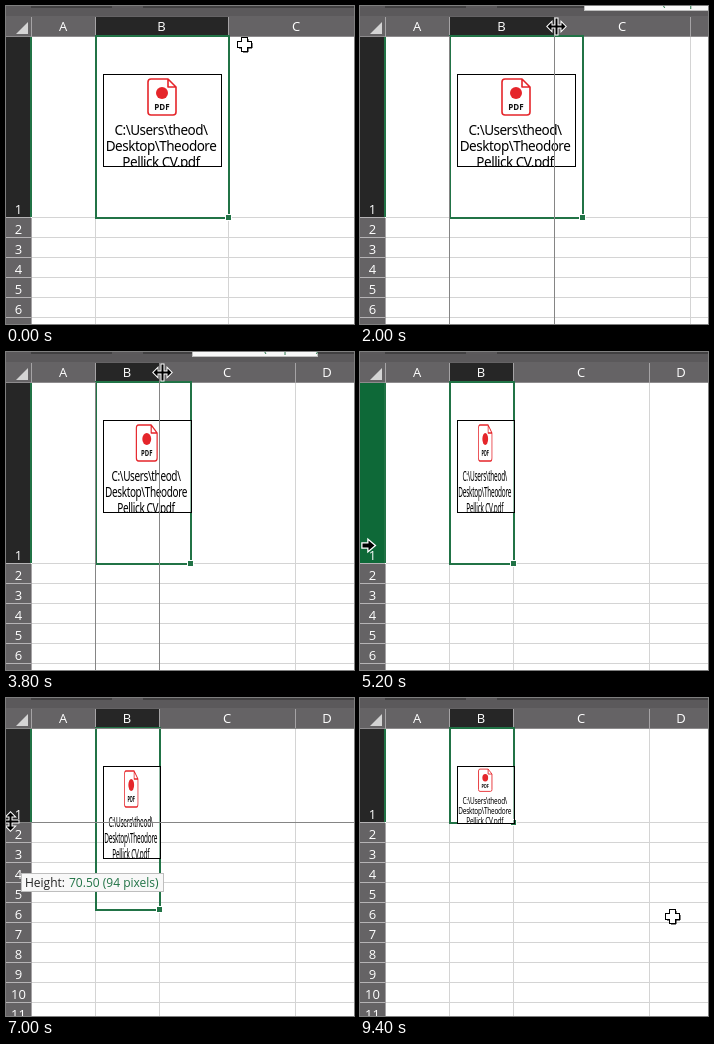
An HTML page with a canvas that plays this animation: 348x318 px, repeating every 9.6 s.

```html
<!DOCTYPE html>
<html lang="en">
<head>
<meta charset="utf-8">
<title>Resizing cells around an embedded file</title>
<style>
  html, body { margin: 0; width: 100%; height: 100%; overflow: hidden; background: #fff; }
  canvas { display: block; }
</style>
</head>
<body>
<canvas id="stage" width="348" height="318"></canvas>
<script>
const W = 348, H = 318, LOOP = 9600, STEP = 200;
const HEAD_X = 25, HEAD_Y = 30, COL_A = 89, COL_C_WIDTH = 136, ROW_HEIGHT = 20;
const GREEN = '#217346', HEADER = '#656365', SELECTED = '#262626', GRID = '#d4d4d4';
const UI_FONT = '13px "Open Sans", "Noto Sans", sans-serif';
const ctx = document.getElementById('stage').getContext('2d');

// Keyframes: [time, value...]
const COLUMN_EDGE = [[1400, 222], [2200, 184], [3200, 184], [3800, 153]];
const ROW_EDGE = [[5800, 211], [7000, 124]];
const POINTER = [
  [0, 238, 38], [200, 120, 160], [400, 9, 281], [600, 70, 170], [800, 180, 60], [1000, 225, 20],
  [1400, 225, 20], [2200, 186, 20], [3200, 186, 20], [3800, 156, 20], [4400, 156, 20],
  [4600, 146, 44], [4800, 108, 96], [5000, 48, 160], [5200, 8, 193], [5600, 4, 211],
  [5800, 4, 211], [7000, 4, 123], [8400, 4, 123],
  [8600, 60, 200], [8800, 150, 285], [9000, 240, 304], [9200, 294, 262], [9400, 312, 218]
];
const DRAGS = [
  { from: 1400, to: 2600, axis: 'x', start: 222 },
  { from: 2800, to: 4200, axis: 'x', start: 184 },
  { from: 5800, to: 7400, axis: 'y', start: 211 }
];

function sample(keys, t) {
  if (t <= keys[0][0]) return keys[0].slice(1);
  for (let i = 1; i < keys.length; i++) {
    const a = keys[i - 1], b = keys[i];
    if (t <= b[0]) {
      const k = (t - a[0]) / (b[0] - a[0]);
      return a.slice(1).map((v, n) => Math.round(v + (b[n + 1] - v) * k));
    }
  }
  return keys[keys.length - 1].slice(1);
}

function box(x, y, w, h, color) {
  ctx.fillStyle = color;
  ctx.fillRect(x, y, w, h);
}

function label(text, x, y, color = '#fff', align = 'center', font = UI_FONT) {
  ctx.font = font;
  ctx.fillStyle = color;
  ctx.textAlign = align;
  ctx.fillText(text, x, y);
}

function polygon(points, fill, stroke, width) {
  ctx.beginPath();
  points.forEach(([x, y]) => ctx.lineTo(x, y));
  ctx.closePath();
  if (stroke) {
    ctx.strokeStyle = stroke;
    ctx.lineWidth = width;
    ctx.stroke();
  }
  ctx.fillStyle = fill;
  ctx.fill();
}

function drawSheet(colEdge, rowEdge, hoverY) {
  box(0, 0, W, H, '#fff');
  box(0, 0, W, HEAD_Y + 1, HEADER);
  box(0, 0, W, 10, '#5b595b');
  box(5, 0, 101, 2, '#414041');
  box(137, 0, W, 2, '#414041');
  box(0, 0, HEAD_X, H, HEADER);
  box(0, 0, HEAD_X, 10, '#5b595b');
  box(0, HEAD_Y, W, 1, '#8d8b8d');
  polygon([[10, 28], [22, 28], [22, 16]], '#d4d4d4');

  const edges = [HEAD_X, COL_A, colEdge, colEdge + COL_C_WIDTH, colEdge + COL_C_WIDTH + 64];
  box(COL_A + 1, 11, colEdge - COL_A - 1, 18, SELECTED);
  box(COL_A + 1, 29, colEdge - COL_A - 1, 2, GREEN);
  edges.forEach((x, i) => {
    box(x, 11, 1, 20, '#a5a3a5');
    if (i) box(x, HEAD_Y + 1, 1, H, GRID);
    if (i < 4) label('ABCD'[i], (x + edges[i + 1]) / 2, 25);
  });

  const hovered = y0 => hoverY !== null && hoverY > y0;
  for (let row = 1, top = HEAD_Y; top < H; row++) {
    const bottom = row === 1 ? rowEdge : top + ROW_HEIGHT;
    const isHover = hovered(top) && hoverY < bottom;
    if (row === 1 || isHover) {
      box(0, top + 1, HEAD_X, bottom - top - 1, isHover ? '#0e6938' : SELECTED);
    }
    if (row === 1) box(HEAD_X - 1, top + 1, 2, bottom - top - 1, GREEN);
    box(0, bottom, HEAD_X, 1, '#b5b3b5');
    box(HEAD_X + 1, bottom, W, 1, GRID);
    label(row, 12.5, bottom - 3);
    top = bottom;
  }
  box(HEAD_X, rowEdge + 1, 1, H, '#a5a3a5');
}

function drawSelection(right, bottom) {
  ctx.strokeStyle = GREEN;
  ctx.lineWidth = 2;
  ctx.strokeRect(COL_A + 1, HEAD_Y, right - COL_A, bottom - HEAD_Y + 1);
  box(right - 3, bottom - 3, 7, 7, '#fff');
  box(right - 2, bottom - 2, 5, 5, GREEN);
}

// The embedded file shrinks together with its cell.
function drawFile(right, bottom) {
  const x = 97, y = 68;
  const w = Math.min(118, right + 0.5 - x), h = Math.min(92, bottom + 1 - y);
  ctx.save();
  ctx.beginPath();
  ctx.rect(x, y, w + 1, h + 1);
  ctx.clip();
  box(x, y, w, h, '#fff');
  ctx.translate(x, y);
  ctx.scale(w / 118, h / 92);

  ctx.strokeStyle = '#e5252a';
  ctx.lineWidth = 1.6;
  ctx.lineJoin = 'round';
  ctx.stroke(new Path2D('M48 5H65L73 13V38Q73 41 70 41H48Q45 41 45 38V8Q45 5 48 5ZM65 5V13H73'));
  ctx.fillStyle = '#e5252a';
  ctx.beginPath();
  ctx.arc(59, 19, 6, 0, 7);
  ctx.fill();
  label('PDF', 59, 36, '#111', 'center', 'bold 8px "Open Sans", sans-serif');

  ctx.letterSpacing = '-0.5px';
  ['C:\\Users\\theod\\', 'Desktop\\Theodore', 'Pellick CV.pdf'].forEach((line, i) =>
    label(line, 58, 61 + 16 * i, '#000', 'center', '13.5px "Noto Sans", "Open Sans", sans-serif'));
  ctx.letterSpacing = '0px';
  ctx.restore();
  ctx.strokeStyle = '#000';
  ctx.lineWidth = 1;
  ctx.strokeRect(x + 0.5, y + 0.5, Math.round(w), Math.round(h));
}

function drawTip(x, y, w, name, value) {
  box(x, y, w, 19, '#bebebe');
  box(x + 1, y + 1, w - 2, 17, '#f8f8f8');
  const font = '12px "Open Sans", "Noto Sans", sans-serif';
  label(name, x + 4, y + 14, '#222', 'left', font);
  label(value, x + 8 + ctx.measureText(name).width, y + 14, GREEN, 'left', font);
}

function drawDrag({ axis, start }, colEdge, rowEdge) {
  if (axis === 'x') {
    box(COL_A, HEAD_Y, 1, H, '#858585');
    box(colEdge, HEAD_Y - 19, 1, H, '#858585');
    const pixels = colEdge - COL_A;
    drawTip(start + 2, -14, 126, 'Width:', `${((pixels - 5) / 7).toFixed(2)} (${pixels} pixels)`);
  } else {
    box(0, HEAD_Y, W, 1, '#858585');
    box(0, rowEdge, W, 1, '#858585');
    const pixels = rowEdge - HEAD_Y;
    drawTip(15, start - 36, 143, 'Height:', `${(pixels * 0.75).toFixed(2)} (${pixels} pixels)`);
  }
}

function drawPointer(x, y, kind) {
  ctx.save();
  ctx.translate(x + 0.5, y + 0.5);
  ctx.lineJoin = 'miter';
  if (kind === 'cross') {
    const a = 2.5, b = 6.5;
    const plus = [[-a, -b], [a, -b], [a, -a], [b, -a], [b, a], [a, a],
                  [a, b], [-a, b], [-a, a], [-b, a], [-b, -a], [-a, -a]];
    polygon(plus.map(([px, py]) => [px + 1, py + 1]), '#000', '#000', 1);
    polygon(plus, '#fff', '#000', 2);
  } else if (kind === 'arrow') {
    polygon([[-6, -2], [0, -2], [0, -5], [6, 0], [0, 5], [0, 2], [-6, 2]], '#000', '#fff', 2.5);
  } else {
    if (kind === 'rowResize') ctx.rotate(Math.PI / 2);
    polygon([[-9, 0], [-5, -4], [-5, -1], [-1, -1], [-1, -8], [1, -8], [1, -1], [5, -1], [5, -4],
             [9, 0], [5, 4], [5, 1], [1, 1], [1, 8], [-1, 8], [-1, 1], [-5, 1], [-5, 4]],
            '#000', '#fff', 2);
  }
  ctx.restore();
}

function pointerKind(t, x) {
  if (t >= 1000 && t < 4600) return 'columnResize';
  if (t >= 5600 && t < 8600) return 'rowResize';
  return x < HEAD_X ? 'arrow' : 'cross';
}

function render(now) {
  const t = Math.floor((now % LOOP) / STEP) * STEP;
  const [colEdge] = sample(COLUMN_EDGE, t);
  const [rowEdge] = sample(ROW_EDGE, t);
  const [x, y] = sample(POINTER, t);
  const kind = pointerKind(t, x);
  const drag = DRAGS.find(d => t >= d.from && t < d.to);
  const right = drag && drag.axis === 'x' ? drag.start : colEdge;
  const bottom = drag && drag.axis === 'y' ? drag.start : rowEdge;

  drawSheet(colEdge, rowEdge, kind === 'arrow' ? y : null);
  drawSelection(right, bottom);
  drawFile(right, bottom);
  if (drag) drawDrag(drag, colEdge, rowEdge);
  if (t < 8200 || t >= 8600) drawPointer(x, y, kind);
  requestAnimationFrame(() => render(performance.now() - began));
}

const began = performance.now();
render(0);
</script>
</body>
</html>
```
